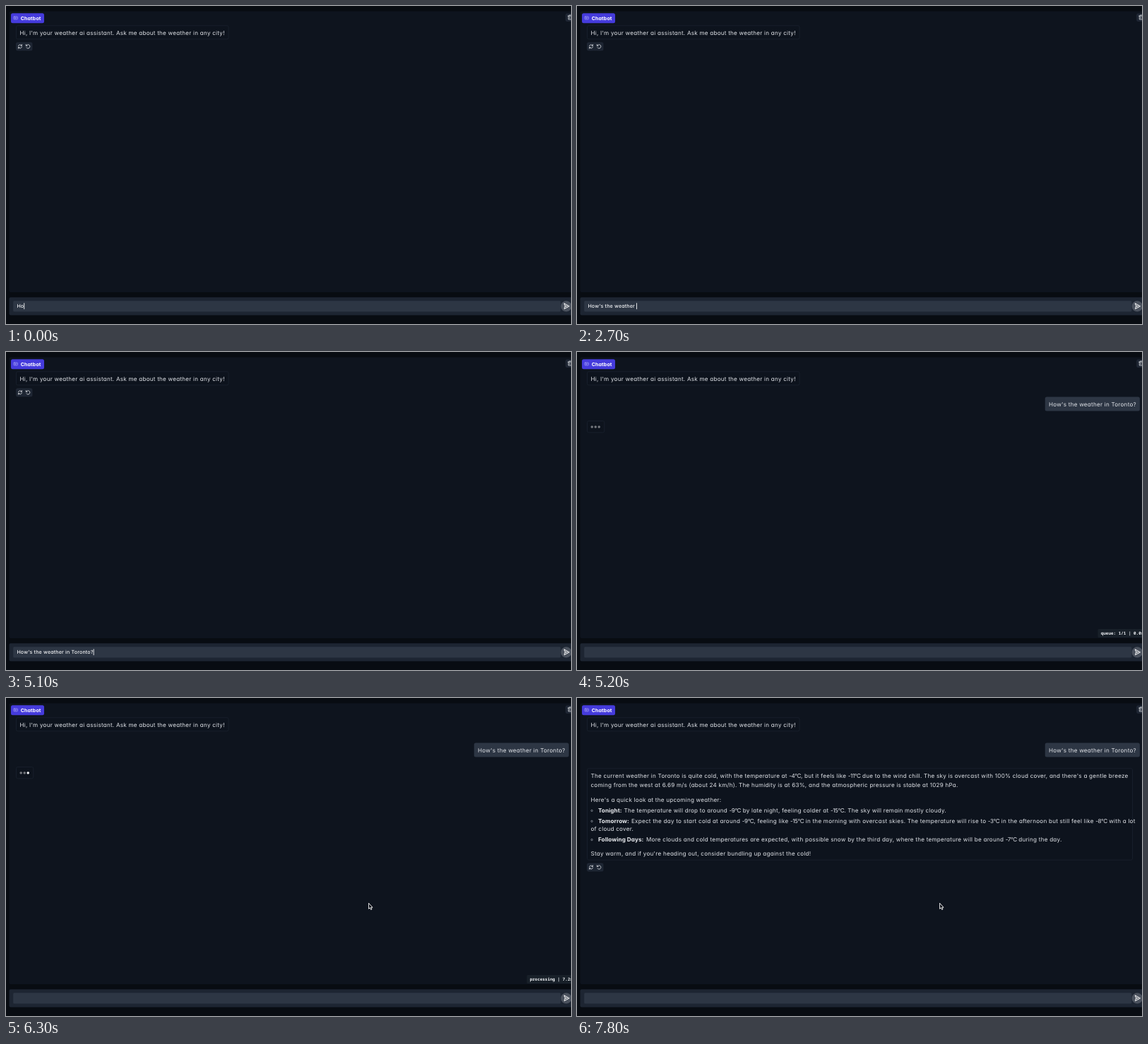
Recreate the animation shown at these times as an HTML page. Size 800 by 450 pixels, loop 8000 ms.

```html
<!DOCTYPE html>
<html lang="en">
<head>
<meta charset="utf-8">
<title>Weather chat</title>
<style>
html, body { margin: 0; width: 100%; height: 100%; overflow: hidden; background: #080c12; }
svg { display: block; width: 800px; height: 450px; }
text { white-space: pre; font: 400 8.1px Inter, "Open Sans", sans-serif; letter-spacing: .24px; fill: #e0e3e8; font-feature-settings: "cv11"; text-rendering: geometricPrecision; }
text.bold { font-weight: 700; letter-spacing: .1px; fill: #eceef2; }
.temp { letter-spacing: -.4px; }
#typed { font-weight: 500; font-size: 7.1px; letter-spacing: .16px; fill: #f3f4f6; }
#status { font: 600 5.95px "Noto Sans Mono", "DejaVu Sans Mono", monospace; letter-spacing: 0; fill: #eceef2; }
.box { fill: #0d131d; stroke: #1b222f; stroke-width: .8; }
.chip { fill: #1d2532; stroke: #2a3342; stroke-width: .5; }
.line { fill: none; stroke: #e0e3e8; stroke-width: .8; stroke-linecap: round; stroke-linejoin: round; }
</style>
</head>
<body>
<svg viewBox="0 0 800 450">
  <defs>
    <g id="tools">
      <rect class="chip" x="14.5" y="-5.5" width="22.5" height="11" rx="1.5"/>
      <path class="line" d="M17.4 -.5A2.6 2.6 0 0 1 22 -1.5M22.4 -2.8V-1.1H20.8M22.4 .5A2.6 2.6 0 0 1 17.8 1.5M17.4 2.8V1.1H19"/>
      <path class="line" d="M28.7 -1.2A2.7 2.7 0 1 1 28.9 1.5M28.3 -2.8V-1H30.1"/>
    </g>
  </defs>
  <rect width="800" height="450" fill="#080c12"/>
  <rect x="4.5" y="7.6" width="800" height="397.4" rx="2" fill="#0e141e"/>

  <rect x="7" y="10.2" width="47" height="14" rx="2.5" fill="#453bdc"/>
  <rect x="11" y="15" width="5.4" height="3.9" rx=".8" class="line" style="stroke:#b9b5fa;stroke-width:.6"/>
  <path d="M12.5 16.4H15M12.5 17.6H14.2" class="line" style="stroke:#b9b5fa;stroke-width:.5"/>
  <text x="20.7" y="19.7" class="bold" style="font-size:7.1px;fill:#fff">Chatbot</text>

  <rect class="chip" x="792.7" y="11" width="12" height="10.5" rx="1.5"/>
  <path class="line" d="M795.6 14.1H801M797.2 14V13H800M796.3 14.4V19H801M798.2 15.5V17.7"/>

  <rect class="box" x="14.5" y="27.8" width="300.5" height="19" rx="2"/>
  <text x="19.5" y="40.7">Hi, I'm your weather ai assistant. Ask me about the weather in any city!</text>
  <use id="idle" href="#tools" y="57.3"/>

  <g id="asked">
    <rect x="662.7" y="63.4" width="134.2" height="20" rx="2.5" fill="#2d3644"/>
    <text x="668" y="77">How's the weather in Toronto?</text>
  </g>

  <g id="wait">
    <rect class="box" x="14.5" y="97.7" width="24.2" height="16.2" rx="2"/>
    <g id="dots" fill="#f3f4f6">
      <circle cx="21.2" cy="106" r="1.75"/><circle cx="26.2" cy="106" r="1.75"/><circle cx="31.2" cy="106" r="1.75"/>
    </g>
    <rect x="737.5" y="392" width="70" height="12" rx="1.5" fill="#182029"/>
    <text id="status" x="741.7" y="400.3"></text>
  </g>

  <g id="reply">
    <rect id="bubble" class="box" x="14.5" y="99.8" width="772" height="129.4" rx="2"/>
  </g>
  <use id="done" href="#tools" y="239.6"/>

  <rect x="4.5" y="412.2" width="800" height="25.2" rx="2" fill="#1d2532"/>
  <rect x="10.2" y="417.2" width="775.2" height="15.2" rx="1.5" fill="#2d3644"/>
  <text id="typed" x="15.4" y="427.3"></text>
  <rect id="caret" y="420.3" width=".9" height="8.8" fill="#f3f4f6"/>
  <circle cx="793.2" cy="424.8" r="7.6" fill="#4a515d"/>
  <path class="line" style="stroke:#fff;stroke-width:1" d="M790.5 421L797.5 424.8L790.5 428.6L791.6 424.8ZM791.6 424.8H794.5"/>

  <path id="mouse" d="M513.6 290.3V298.4L515.4 296.8L516.7 299.5L518 298.9L516.8 296.3H519Z" fill="#0b0f16" stroke="#fff" stroke-width=".9"/>
</svg>
<script>
const LOOP = 8000, SENT = 5200, SKIP = 5800, REPLY = 6400, DONE = 7500;
const question = "How's the weather in Toronto?";
// [time, letters typed]
const keys = [[0, 2], [100, 3], [500, 5], [600, 7], [700, 9], [900, 10], [1100, 11], [1500, 12], [1600, 13],
  [1900, 14], [2100, 15], [2300, 16], [2500, 17], [2700, 18], [3000, 19], [3100, 20], [3300, 21],
  [3700, 22], [3800, 23], [3900, 24], [4000, 25], [4200, 26], [4300, 27], [4400, 28], [4900, 29]];
// [x, baseline, words, bold]
const lines = [
  [19.5, 113.3, "The current weather in Toronto is quite cold, with the temperature at -4°C, but it feels like -11°C due to the wind chill. The sky is overcast with 100% cloud cover, and there's a gentle breeze"],
  [19.5, 126.3, "coming from the west at 6.69 m/s (about 24 km/h). The humidity is at 63%, and the atmospheric pressure is stable at 1029 hPa."],
  [19.5, 147, "Here's a quick look at the upcoming weather:"],
  [30, 162, "Tonight:", true],
  [66.6, 162, "The temperature will drop to around -9°C by late night, feeling colder at -15°C. The sky will remain mostly cloudy."],
  [30, 177, "Tomorrow:", true],
  [77, 177, "Expect the day to start cold at around -9°C, feeling like -15°C in the morning with overcast skies. The temperature will rise to -3°C in the afternoon but still feel like -8°C with a lot"],
  [19.5, 188, "of cloud cover."],
  [30, 203.2, "Following Days:", true],
  [98, 203.2, "More clouds and cold temperatures are expected, with possible snow by the third day, where the temperature will be around -7°C during the day."],
  [19.5, 223, "Stay warm, and if you're heading out, consider bundling up against the cold!"]
];
const total = lines.reduce((sum, line) => sum + line[2].length, 0);

const $ = id => document.getElementById(id);
const show = (id, on) => $(id).style.display = on ? "" : "none";
const add = (name, attrs) => {
  const el = document.createElementNS("http://www.w3.org/2000/svg", name);
  for (const k in attrs) el.setAttribute(k, attrs[k]);
  return $("reply").appendChild(el);
};

const rows = lines.map(([x, y, words, bold]) => ({
  y, words,
  text: add("text", { x, y, class: bold ? "bold" : "" }),
  mark: bold && add("circle", { cx: 21, cy: y - 2.6, r: 1.2, fill: "none", stroke: "#aeb4be", "stroke-width": .6 })
}));

// Writes the first letters of the reply and grows its bubble with them.
function write(count) {
  let bottom = 0;
  for (const { y, words, text, mark } of rows) {
    const part = words.slice(0, Math.max(0, count));
    text.innerHTML = part.replace(/-\d+°C/g, '<tspan class="temp">$&</tspan>');
    if (mark) mark.setAttribute("opacity", part ? 1 : 0);
    if (part) bottom = y + 6.2;
    count -= words.length;
  }
  const first = rows[0].text.getComputedTextLength() + 10;
  $("bubble").setAttribute("width", rows[1].text.textContent ? 772 : first);
  $("bubble").setAttribute("height", bottom - 99.8);
}

function draw(ms) {
  const t = Math.floor(ms / 100) * 100;
  const sent = t >= SENT, replying = t >= REPLY;
  show("idle", !sent);
  show("asked", sent);
  show("wait", sent && !replying);
  show("reply", replying);
  show("done", t >= DONE);
  show("mouse", t >= SKIP);
  show("caret", !sent);

  const count = keys.filter(k => k[0] <= t).pop()[1];
  $("typed").textContent = sent ? "" : question.slice(0, count);
  if (!sent) $("caret").setAttribute("x", 15.4 + $("typed").getComputedTextLength());
  if (replying) write(Math.ceil(total * Math.min(1, (t - REPLY + 100) / (DONE - REPLY))));

  const clock = (t - SENT) / 1000 + (t >= SKIP ? 6.1 : 0);
  $("status").textContent = (t >= SKIP ? "processing" : "queue: 1/1") + " | " + clock.toFixed(1) + "s";
  [...$("dots").children].forEach((dot, i) => {
    const gap = Math.abs(clock % 1.5 - .3 - .45 * i);
    dot.setAttribute("opacity", .45 + .55 * Math.max(0, 1 - gap / .25));
  });
}

const start = performance.now();
function tick() {
  draw((performance.now() - start) % LOOP);
  requestAnimationFrame(tick);
}
draw(0);
requestAnimationFrame(tick);
</script>
</body>
</html>
```
